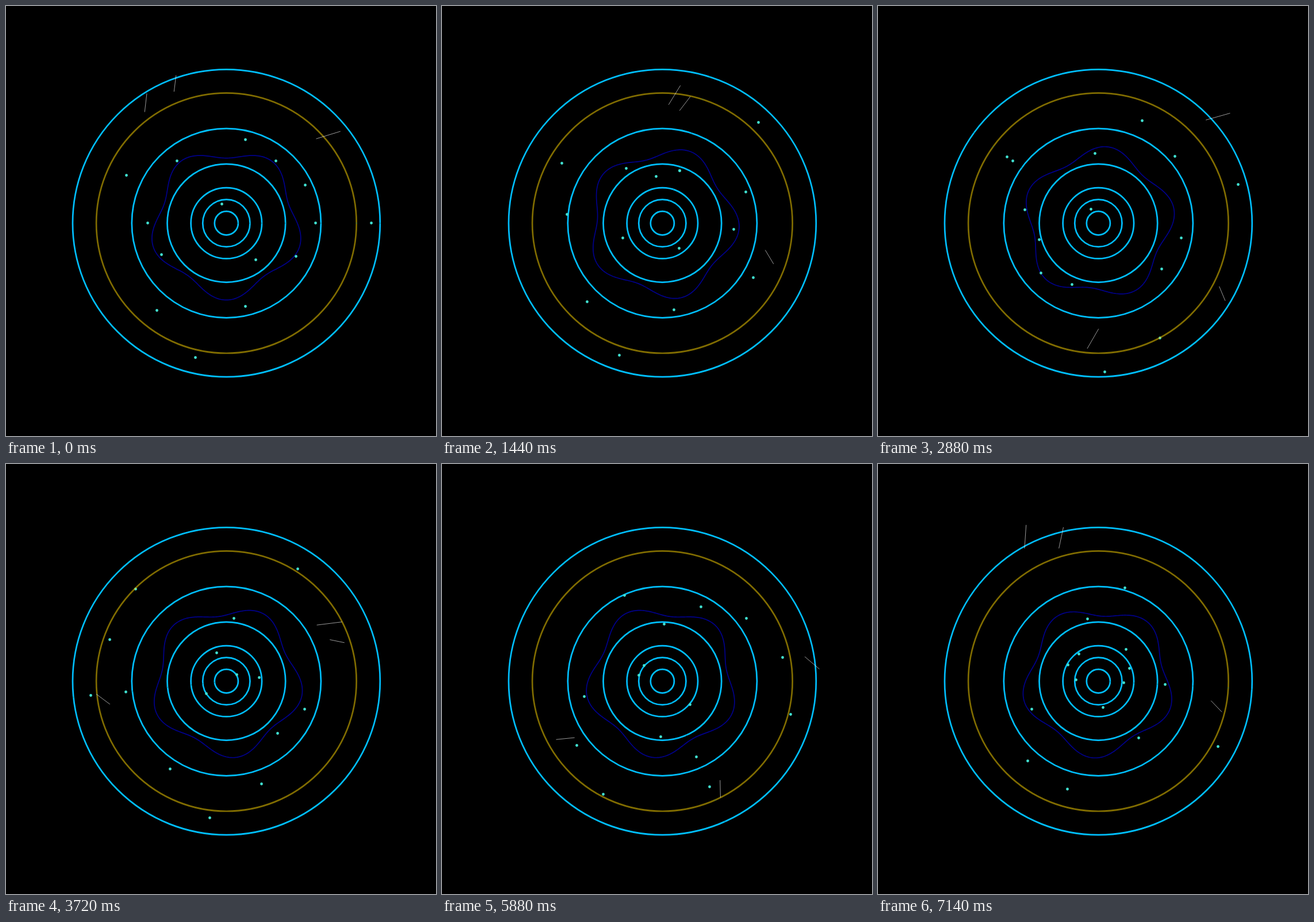
An HTML page with a canvas that plays this animation: 748 by 748 pixels, repeating every 7200 ms.

```html
<!DOCTYPE html>
<html lang="en">
<head>
<meta charset="utf-8">
<title>Orbits</title>
<style>
html, body { margin: 0; width: 100%; height: 100%; overflow: hidden; background: #000; }
canvas { display: block; }
</style>
</head>
<body>
<canvas id="stage" width="748" height="748"></canvas>
<script>
const ctx = document.getElementById('stage').getContext('2d');
const CX = 383.35, CY = 377.74, UNIT = 20.57, HALF = 14 * UNIT;
const TAU = Math.PI * 2, DEG = Math.PI / 180;
const STEP = 60, STEPS = 120, DOTS = 15, STREAKS = 3;
const BLUE_RINGS = [1, 2, 3, 5, 8, 13], GOLD_RING = 11;

// Repeatable random numbers in a range, one sequence per step.
function seeded(seed) {
  let s = Math.imul(seed + 1, 0x9e3779b1);
  return (lo, hi) => {
    s = (s + 0x6d2b79f5) | 0;
    let x = Math.imul(s ^ (s >>> 15), s | 1);
    x ^= x + Math.imul(x ^ (x >>> 7), x | 61);
    return lo + (hi - lo) * ((x ^ (x >>> 14)) >>> 0) / 4294967296;
  };
}

const polar = (r, a) => [CX + r * UNIT * Math.cos(a), CY + r * UNIT * Math.sin(a)];

function stroke(color, width) {
  ctx.strokeStyle = color;
  ctx.lineWidth = width;
  ctx.stroke();
}

function dot(x, y, radius, color) {
  ctx.fillStyle = color;
  ctx.beginPath();
  ctx.arc(x, y, radius, 0, TAU);
  ctx.fill();
}

// A ring carries a faint mark that turns with the dots.
function ring(r, turn, color) {
  ctx.beginPath();
  ctx.arc(CX, CY, r * UNIT, 0, TAU);
  stroke(color, 2.7);
  dot(...polar(r, turn), 1, 'rgba(0,128,128,.6)');
}

function scatterDots(turn, rnd) {
  for (let k = 0; k < DOTS; k++) {
    const [x, y] = polar(rnd(1, 13), turn + k * TAU / (DOTS - 1));
    dot(Math.floor(x) + 0.5, Math.floor(y) + 0.5, 2.4, '#40e0d0');
  }
}

function wave(n) {
  ctx.beginPath();
  for (let i = 0; i < 360; i++) {
    const a = i * DEG;
    ctx.lineTo(...polar(6 + 0.5 * Math.sin(5 * a + n * Math.PI / 10), a));
  }
  ctx.closePath();
  stroke('#00008b', 1.7);
}

function streak(rnd) {
  const a = rnd(0, TAU), r = rnd(8, 13);
  ctx.beginPath();
  ctx.moveTo(...polar(r, a));
  ctx.lineTo(...polar(r + rnd(1, 2), a + rnd(0.05, 0.1)));
  stroke('rgba(255,255,255,.6)', 1);
}

function draw(n) {
  const turn = -3 * n * DEG, rnd = seeded(n);
  ctx.fillStyle = '#000';
  ctx.fillRect(0, 0, 748, 748);
  ctx.save();
  ctx.beginPath();
  ctx.rect(CX - HALF, CY - HALF, 2 * HALF, 2 * HALF);
  ctx.clip();

  for (const r of BLUE_RINGS) ring(r, turn, '#00bfff');
  wave(n);
  scatterDots(turn, rnd);
  ring(GOLD_RING, turn, 'rgba(255,215,0,.5)');
  for (let i = 0; i < STREAKS; i++) streak(rnd);
  ctx.restore();
}

const start = performance.now();
function tick() {
  draw(Math.floor((performance.now() - start) / STEP) % STEPS);
  requestAnimationFrame(tick);
}
tick();
</script>
</body>
</html>
```
